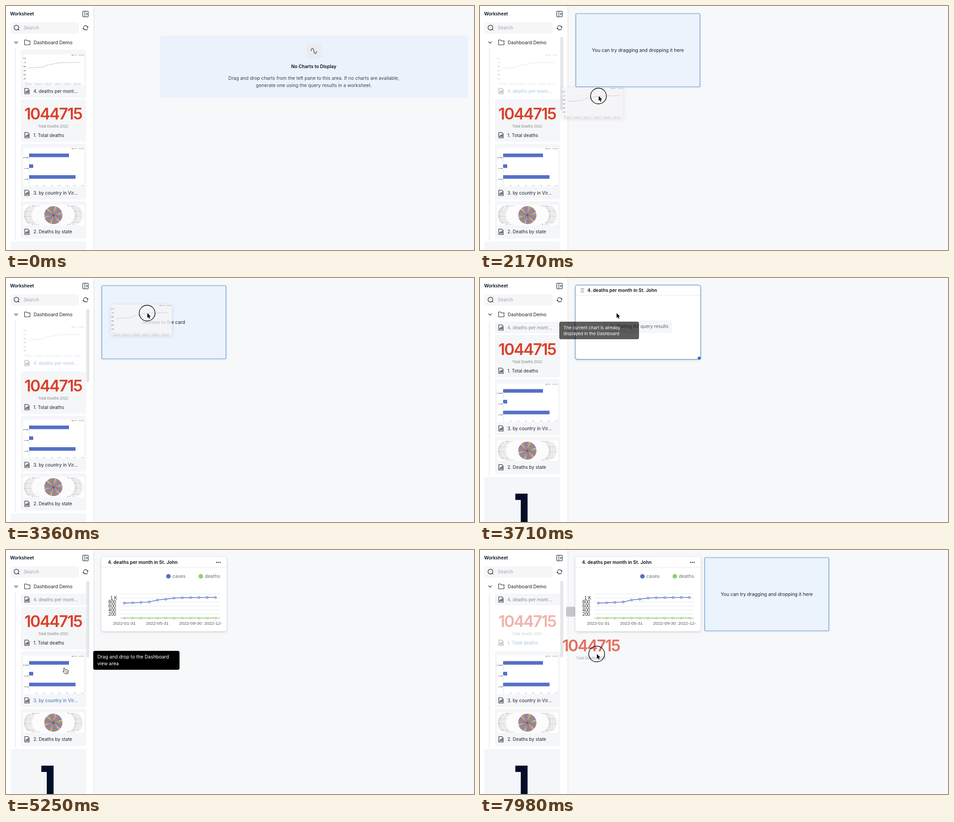
An HTML page with a canvas for the animation above (8000 ms loop, 1033 px wide and 542 px high).

```html
<!DOCTYPE html>
<html lang="en">
<head>
<meta charset="utf-8">
<title>Dashboard</title>
<style>
html, body { margin: 0; width: 100%; height: 100%; overflow: hidden; background: #f7f8fa; }
canvas { display: block; width: 1033px; height: 542px; }
</style>
</head>
<body>
<canvas id="stage"></canvas>
<script>
const W = 1033, H = 542, LOOP = 8000, STEP = 70;
const canvas = document.getElementById('stage');
const g = canvas.getContext('2d');
const dpr = window.devicePixelRatio || 1;
canvas.width = W * dpr;
canvas.height = H * dpr;

const UI = 'Inter, "Noto Sans", sans-serif';
const ARIAL = '"Liberation Sans", Arial, sans-serif';
const INK = '#1c212b', LINK = '#2e6fb7', BLUE = '#5470c6', GREEN = '#91cc75';
const PALETTE = [BLUE, GREEN, '#fac858', '#ee6666', '#73c0de', '#3ba272', '#fc8452', '#9a60b4', '#ea7ccc'];
const TREND = [118, 117.3, 116.4, 115.4, 111, 109.3, 106.8, 106, 105.7, 105.5, 105.4, 105.2];

// Pointer path: time, x, y
const PATH = [
  [70, 430, 535], [700, 118, 130], [980, 118, 130], [1260, 283, 148], [1540, 288, 200],
  [1820, 262, 200], [2170, 262, 200], [2380, 240, 266], [2660, 246, 136], [2940, 316, 79],
  [3360, 312, 78], [3640, 301.5, 78], [4200, 301.5, 78], [4620, 212, 150], [5110, 139, 230],
  [5250, 130, 262], [5390, 123, 279], [5700, 123, 279], [5880, 123, 277], [6160, 123, 276],
  [6610, 123, 276], [7140, 109, 173], [7420, 109, 173], [7490, 117, 177], [7700, 117, 177],
  [7980, 258, 231]
];

function pointer(t) {
  const i = PATH.findIndex(p => p[0] > t);
  if (i < 0) return PATH[PATH.length - 1].slice(1);
  const a = PATH[Math.max(0, i - 1)], b = PATH[i];
  const k = Math.max(0, (t - a[0]) / (b[0] - a[0] || 1));
  const e = k * k * (3 - 2 * k);
  return [a[1] + (b[1] - a[1]) * e, a[2] + (b[2] - a[2]) * e];
}

const within = (t, a, b) => t >= a && t < b;

function text(s, x, y, size, color = INK, align = 'left', weight = 400, family = UI) {
  g.font = `${weight} ${size}px ${family}`;
  g.fillStyle = color;
  g.textAlign = align;
  g.textBaseline = 'alphabetic';
  g.fillText(s, x, y + size * 0.36);
}

function box(x, y, w, h, fill, r = 0, stroke, lw = 1) {
  g.beginPath();
  g.roundRect(x, y, w, h, r);
  if (fill) { g.fillStyle = fill; g.fill(); }
  if (stroke) { g.strokeStyle = stroke; g.lineWidth = lw; g.stroke(); }
}

function line(points, color = INK, lw = 1) {
  g.beginPath();
  points.forEach(([x, y], i) => i ? g.lineTo(x, y) : g.moveTo(x, y));
  g.strokeStyle = color;
  g.lineWidth = lw;
  g.stroke();
}

function ring(x, y, r, fill, stroke, lw = 1) {
  g.beginPath();
  g.arc(x, y, r, 0, 7);
  if (fill) { g.fillStyle = fill; g.fill(); }
  if (stroke) { g.strokeStyle = stroke; g.lineWidth = lw; g.stroke(); }
}

function poly(points, fill, stroke, lw = 1) {
  g.beginPath();
  points.forEach(([x, y]) => g.lineTo(x, y));
  g.closePath();
  if (stroke) { g.strokeStyle = stroke; g.lineWidth = lw; g.stroke(); }
  g.fillStyle = fill;
  g.fill();
}

function faded(alpha, draw, dx = 0, dy = 0) {
  g.save();
  g.globalAlpha *= alpha;
  g.translate(dx, dy);
  draw();
  g.restore();
}

function shadowed(blur, color, dy, draw) {
  g.save();
  g.shadowBlur = blur * dpr;
  g.shadowColor = color;
  g.shadowOffsetY = dy * dpr;
  draw();
  g.restore();
}

function fileIcon(y) {
  poly([[41.5, y - 6], [48, y - 6], [51.3, y - 2.7], [51.3, y + 6], [41.5, y + 6]], 'transparent', INK, 1.1);
  [[44, 1], [46.4, -1], [48.8, -2]].forEach(([x, top]) => line([[x, y + 4], [x, y + top]], INK, 1.5));
}

function cardTitle(s, y, color) {
  fileIcon(y);
  text(s, 60.5, y, 10, color);
}

const cardBg = (y, h) => box(33, y, 144, h, '#f5f6f8', 5);

function miniLegend(y) {
  [[147, BLUE], [162, GREEN]].forEach(([x, c], i) => {
    box(x - 2, y - 1, 2.6, 2, c, 1);
    text(i ? 'deaths' : 'cases', x + 1.5, y, 2.6, '#666');
  });
}

function lineThumb(y, bg = '#fff') {
  if (bg) box(38, y, 134, 68, bg, 2);
  miniLegend(y + 2);
  ['1.2 K', '1 K', '800', '600', '400', '200', '0'].forEach((s, i) => {
    text(s, 44, y + 10 + i * 9, 2.8, '#333', 'right', 500);
  });
  line([[47, y + 64.5], [167, y + 64.5]], '#c3c7cc', 0.5);
  line(TREND.map((v, i) => [50 + i * 10.35, v + y - 87]), '#a9afb8', 0.7);
  TREND.forEach((v, i) => {
    ring(50 + i * 10.35, v + y - 87, 0.5, '#8b93a3');
    ring(50 + i * 10.35, y + 64, 0.5, '#a0aa9a');
  });
  for (let i = 0; i < 6; i++) text('2022-0' + (i * 2 + 1) % 10 + '-31', 50 + i * 21.5, y + 66.8, 2.5, '#777', 'center');
}

function total(y) {
  g.save();
  g.letterSpacing = '-2px';
  text('1044715', 104, y, 35, '#d9412b', 'center', 560);
  g.restore();
  text('Total Deaths 2022', 104.3, y + 28, 8.2, '#85878b', 'center', 400, ARIAL);
}

function barThumb(y) {
  box(38, y, 134, 86, '#fff', 2);
  miniLegend(y + 2);
  [['St. Thomas', 88], ['St. John', 9], ['St. Croix', 102.5]].forEach(([s, w], i) => {
    const by = y + 12.7 + i * 24;
    box(51, by, w, 8, BLUE);
    line([[51, by + 10], [51, by + 19]], '#b9bdc5', 0.6);
    text(s, 50, by + 9, 2.3, '#222', 'right', 600);
  });
  for (let i = 0; i < 8; i++) text(i ? i * 200 : '0', 51 + i * 16.8, y + 84, 2.5, '#777', 'center');
}

function pieThumb(y) {
  box(38, y, 134, 45, '#fff', 2);
  const cx = 104.5, cy = y + 22.5, n = 54, turn = 2 * Math.PI / n;
  for (let i = 0; i < n; i++) {
    const a = i * turn - Math.PI / 2;
    g.beginPath();
    g.moveTo(cx, cy);
    g.arc(cx, cy, 20, a, a + turn);
    g.fillStyle = PALETTE[i % 9];
    g.fill();
    line([[cx, cy], [cx + 20 * Math.cos(a), cy + 20 * Math.sin(a)]], 'rgba(70,60,80,.5)', 0.5);
  }
  for (let i = 0; i < 16; i++) {
    const k = i / 7.5 - 1, ry = cy + k * 20.8;
    const off = 30 + 17 * Math.sqrt(1 - k * k);
    for (const side of [-1, 1]) {
      line([[cx + side * 20 * Math.sqrt(1 - k * k), cy + k * 20], [cx + side * (off - 1), ry]], '#e4e5e8', 0.3);
      text('State ' + (i + 10) + ' (0.02%)', cx + side * off, ry, 2.3, '#808388', side < 0 ? 'right' : 'left');
    }
  }
}

function sidebar(s) {
  box(0, 0, 194, H, '#fff');
  line([[194, 0], [194, H]], '#dfe2e7', 1.2);
  text('Worksheet', 9, 17.5, 10, '#0d1017', 'left', 600);
  box(169.5, 11.5, 12, 12.5, null, 1, INK, 1.1);
  line([[174, 11.5], [174, 24]], INK, 1.1);
  poly([[176.5, 17.8], [179.5, 15.5], [179.5, 20]], INK);
  box(9.5, 36, 151.5, 25.5, '#f5f6f8', 5);
  ring(23, 48, 5.3, null, INK, 1.2);
  line([[26.6, 51.6], [29.3, 54]], INK, 1.2);
  text('Search', 39, 48.3, 10.3, '#a3a6ab');
  for (const a of [0, Math.PI]) {
    g.save();
    g.translate(175.6, 48.4);
    g.rotate(a);
    g.beginPath();
    g.arc(0, 0, 4.8, -2.75, -0.3);
    g.strokeStyle = INK;
    g.lineWidth = 1.2;
    g.stroke();
    poly([[2.6, -2.2], [6.2, -2.6], [5.2, 0.8]], INK);
    g.restore();
  }
  line([[18.6, 79], [22.2, 82.6], [25.8, 79]], INK, 1.1);
  poly([[41, 75.5], [45.5, 75.5], [47, 77.5], [53, 77.5], [53, 86.3], [41, 86.3]], 'transparent', INK, 1.1);
  text('Dashboard Demo', 61, 81, 10.4);

  const dy = s.dropped ? -81 : 0;
  line([[20.5, 95], [20.5, 520 + dy]], '#dcdee2', 1);
  if (s.dropped) {
    cardBg(97, 26);
    cardTitle('4. deaths per mont…', 110, '#85888e');
  } else {
    const chart = () => {
      lineThumb(107);
      cardTitle('4. deaths per mont…', 189, s.hover === 4 || s.drag === 4 ? LINK : INK);
    };
    if (s.drag === 4) faded(0.4, chart);
    else { cardBg(97, 107); chart(); }
  }
  g.save();
  g.translate(0, dy);
  const sum = () => {
    total(239);
    cardTitle('1. Total deaths', 287, s.hover === 1 || s.drag === 1 ? LINK : INK);
  };
  if (s.drag === 1) faded(0.4, sum);
  else { cardBg(207.5, 94.5); sum(); }
  cardBg(306, 124);
  barThumb(315);
  cardTitle('3. by country in Vir…', 415, s.hover === 3 ? LINK : INK);
  cardBg(433.5, 83);
  pieThumb(442);
  cardTitle('2. Deaths by state', 501.5, INK);
  box(9.5, 523, 167.5, 140, '#f5f6f8', 5);
  poly([[78, 560], [105, 560], [105, 640], [90, 640], [90, 574], [78, 574]], '#020d29');
  g.restore();
  if (s.scroll) box(177, 68.5, 7, s.dropped ? 170 : 162.5, '#e5e7ea', 2);
}

function emptyPanel() {
  box(340, 65.5, 680, 138.5, '#ebf2fb', 6);
  box(663.5, 83.5, 32.5, 32.5, '#eaecef', 3);
  g.beginPath();
  g.moveTo(673.5, 100);
  g.bezierCurveTo(674, 92, 678, 92, 679.5, 100);
  g.bezierCurveTo(681, 108, 684.5, 108, 685.3, 100);
  g.strokeStyle = INK;
  g.lineWidth = 1.2;
  g.stroke();
  text('No Charts to Display', 679.3, 134, 10.1, '#0d1017', 'center', 600);
  text('Drag and drop charts from the left pane to this area. If no charts are available,', 679.5, 160, 10.3, '#3e434c', 'center');
  text('generate one using the query results in a worksheet.', 679.5, 176, 10.3, '#3e434c', 'center');
}

function dropZone(x, over) {
  shadowed(5, 'rgba(40,90,150,.2)', 1, () => box(x, 17, 274, 162.5, '#ebf3fc', 1));
  box(x, 17, 274, 162.5, null, 1, '#5b99d3', 1.2);
  text(over ? 'Release to the card' : 'You can try dragging and dropping it here', x + 137, 98.3, 10.3, INK, 'center');
}

function lineChart(t) {
  [[358.5, BLUE, 'cases'], [430, GREEN, 'deaths']].forEach(([x, c, s]) => {
    ring(x, 58.5, 5, c);
    text(s, x + 8.7, 58.5, 10.5, '#6b6f76');
  });
  for (let i = 0; i < 7; i++) {
    line([[252.5, 97.5 + i * 8.95], [472, 97.5 + i * 8.95]], i < 6 ? '#e0e4ea' : '#8d929c', 0.9);
  }
  ['1 K', '800', '600', '400', '200'].forEach((s, i) => {
    text(s, i ? 243 : 245.5, 106.2 + i * 9, 10.2, '#222', 'right', 400, ARIAL);
  });
  g.save();
  g.beginPath();
  g.rect(211, 155, 265.5, 15);
  g.clip();
  ['2022-01-31', '2022-05-31', '2022-09-30', '2022-12-31'].forEach((s, i) => {
    text(s, [261, 334, 407.3, 462.5][i], 162.5, 9.8, '#555960', 'center', 400, ARIAL);
  });
  g.restore();
  const k = Math.min(1, (t - 4060) / 900);
  g.save();
  g.beginPath();
  g.rect(253, 90, 222 * (1 - (1 - k) ** 3), 66);
  g.clip();
  [[BLUE, TREND], [GREEN, TREND.map(() => 151.2)]].forEach(([c, ys]) => {
    const pts = ys.map((y, i) => [261.2 + i * 18.3, y]);
    line(pts, c, 1.4);
    pts.forEach(([x, y]) => ring(x, y, 1.9, '#fff', c, 1.3));
  });
  g.restore();
}

function chartCard(t, active) {
  shadowed(5, 'rgba(30,40,60,.22)', 1.5, () => box(210.5, 15.5, 276.5, 165, '#fff', 5));
  line([[211, 38.5], [486.5, 38.5]], '#e4e7eb', 1);
  if (active) box(210.2, 15.7, 276.8, 165, null, 5, '#6593c3', 1.2);
  text('4. deaths per month in St. John', active ? 237 : 225, 27.2, 10.2, '#0d1017', 'left', 600);
  if (active) {
    [23.5, 27.2, 31].forEach(y => line([[222, y], [230, y]], '#70757e', 1));
    ring(484, 178, 3.3, '#1b6ed0');
  } else {
    [464.8, 468.6, 472.4].forEach(x => ring(x, 27.5, 1.2, INK));
  }
  if (t < 4060) {
    box(272, 94, 152, 28, '#f5f6f7', 4);
    const a = t / 160;
    g.beginPath();
    g.arc(290, 107, 3.5, a, a + 1.6);
    g.strokeStyle = '#3b7cc8';
    g.lineWidth = 1.1;
    g.stroke();
    text('Waiting for query results', 416, 107.3, 10, '#5b6068', 'right');
  } else lineChart(t);
}

function tooltip(x, y, w, h, lines, size, gap, alpha = 1) {
  box(x, y, w, h, `rgba(0,0,0,${alpha})`, 4);
  lines.forEach((s, i) => text(s, x + 9.2, y + 13.6 + i * gap, size, '#fff'));
}

function arrow(x, y) {
  poly([[0, 0], [0, 10.6], [2.4, 8.4], [4.1, 12.2], [6, 11.4], [4.3, 7.7], [7.5, 7.5]]
    .map(p => [x + p[0], y + p[1]]), '#000', '#fff', 1.3);
}

function hand(x, y) {
  g.save();
  g.translate(x, y);
  g.beginPath();
  g.moveTo(-1.6, 7.5);
  g.lineTo(-3, 1.2);
  g.quadraticCurveTo(-2.2, -1.2, -0.6, 0.6);
  g.lineTo(1, 4.6);
  g.quadraticCurveTo(2.2, 3, 3.3, 4.4);
  g.quadraticCurveTo(4.6, 3, 5.5, 4.8);
  g.quadraticCurveTo(7.4, 3.8, 7.4, 6.2);
  g.quadraticCurveTo(8, 9.5, 6.3, 12.8);
  g.lineTo(0.3, 13);
  g.quadraticCurveTo(-2, 10.6, -4.6, 8);
  g.quadraticCurveTo(-4.2, 5.8, -1.6, 7.5);
  g.fillStyle = '#fff';
  g.fill();
  g.strokeStyle = '#111';
  g.lineWidth = 1;
  g.stroke();
  [1.4, 3.4, 5.2].forEach(a => line([[a, 7.5], [a, 10.5]], '#111', 0.7));
  g.restore();
}

// Shadow around a see-through panel, kept outside of it
function outerShadow(x, y, w, h) {
  g.save();
  g.beginPath();
  g.rect(x - 30, y - 30, w + 60, h + 60);
  g.rect(x, y, w, h);
  g.clip('evenodd');
  shadowed(9, 'rgba(60,70,90,.2)', 2, () => box(x, y, w, h, '#fff', 3));
  g.restore();
}

function preview(kind, x, y) {
  if (kind === 4) {
    faded(0.75, () => {
      outerShadow(38, 107, 134, 68);
      box(38, 107, 134, 68, '#f4f5f6', 3);
      lineThumb(107, null);
    }, x - 118, y - 126);
  } else {
    faded(0.75, () => {
      shadowed(6, '#fff', 0, () => total(158));
    }, x - 117, y - 177);
  }
}

function render(t) {
  const [x, y] = pointer(t);
  const pressed = within(t, 980, 3500) || t >= 7490;
  const dropped = t >= 3500;
  const drag = within(t, 2170, 3500) ? 4 : t >= 7770 ? 1 : 0;
  let hover = 0;
  if (!pressed && t >= 70 && x > 33 && x < 177) {
    if (!dropped) hover = y > 97 && y < 204 ? 4 : 0;
    else if (y > 126 && y < 221) hover = 1;
    else if (y > 225 && y < 349) hover = 3;
  }
  const scroll = t >= 70 && (pressed || x < 194);

  g.setTransform(dpr, 0, 0, dpr, 0, 0);
  box(0, 0, W, H, '#f7f8fa');
  sidebar({ dropped, drag, hover, scroll });

  if (drag === 1) {
    if (t >= 7910) box(190, 126, 20.5, 22, '#c6c7c9', 4);
    dropZone(496, false);
  }
  if (dropped) chartCard(t, !pressed && x > 210 && x < 487 && y < 181);
  else if (drag) dropZone(211.5, x > 211 && x < 486 && y < 180);
  else emptyPanel();

  if (within(t, 3500, 3850)) {
    tooltip(175, 97, 176, 39, ['The current chart is already', 'displayed in the Dashboard'],
      9.6, 13.2, t < 3780 ? 0.64 : 0.3);
  }
  if (within(t, 4970, 6860)) {
    tooltip(192.5, 224, 190.5, 42, ['Drag and drop to the Dashboard', 'view area'], 10.4, 14.3);
  }
  if (drag) preview(drag, x, y);
  if (t < 70) return;
  if (pressed) ring(x - 0.5, y, 17.5, null, '#0b0b0b', 1.4);
  if (hover) hand(x, y);
  else arrow(x, y);
}

const start = performance.now();
function tick() {
  const t = (performance.now() - start) % LOOP;
  render(Math.floor(t / STEP) * STEP);
  requestAnimationFrame(tick);
}
tick();
</script>
</body>
</html>
```
